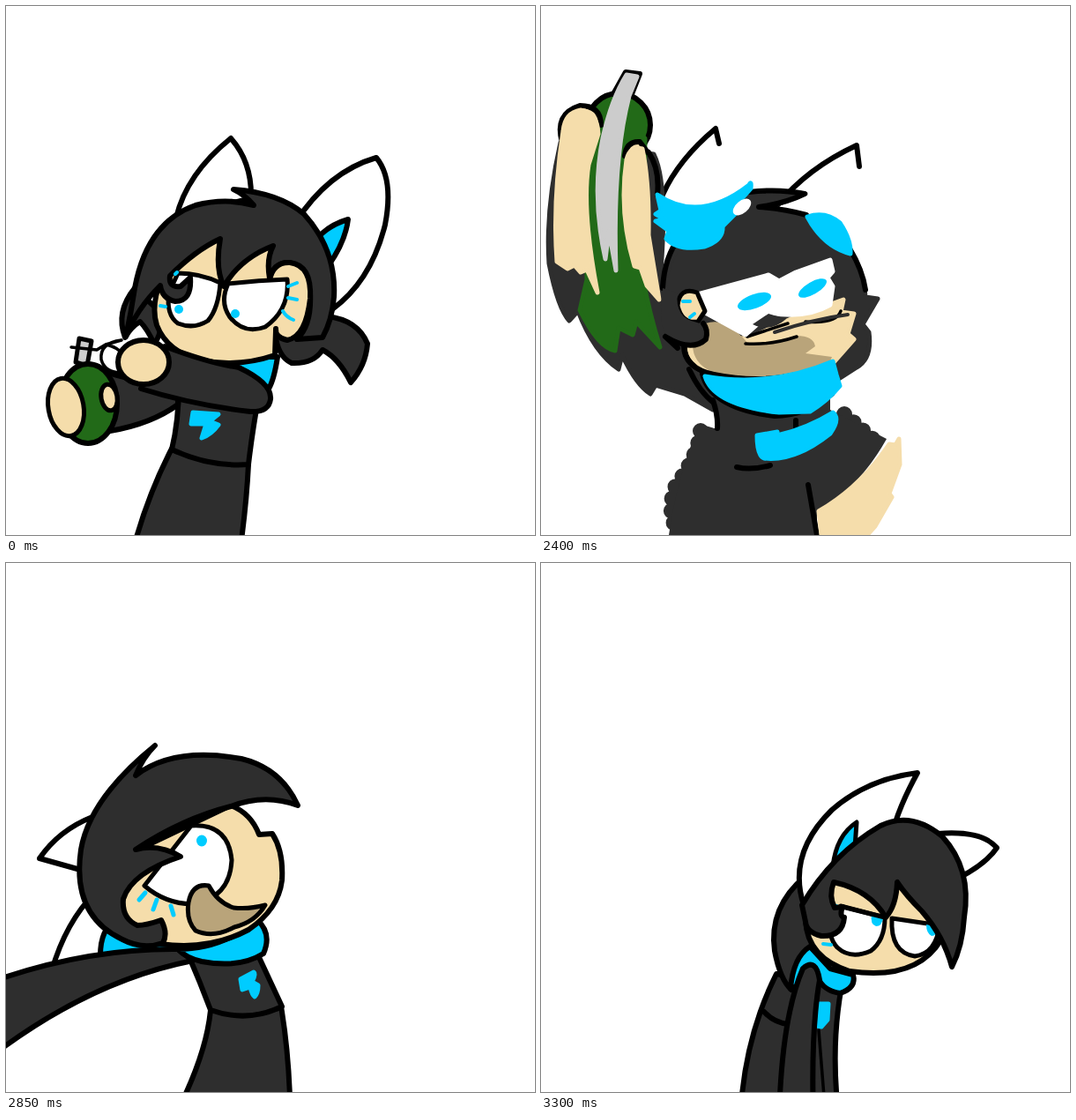
Animation of 600 by 600 pixels, one loop 5300 ms. Source, as an HTML page:

```html
<!DOCTYPE html>
<html lang="en">
<head>
<meta charset="utf-8">
<title>Throw</title>
<style>
html, body { margin: 0; height: 100%; overflow: hidden; background: #fff; }
svg { display: block; width: 100vw; height: 100vh; }
path, ellipse { stroke: #000; stroke-width: 6; stroke-linejoin: round; stroke-linecap: round; fill: none; }
.k { fill: #2e2e2e; } .s { fill: #f5ddab; } .b { fill: #0cf; } .w { fill: #fff; }
.g { fill: #226a18; } .t { fill: #b9a47a; } .a { fill: #ccc; }
.n { stroke: none; }
.e { stroke-width: 5; }
.thin { stroke-width: 3.5; }
.lash { stroke: #0cf; stroke-width: 4; }
.bump { stroke: #2e2e2e; stroke-width: 18; stroke-dasharray: 0 14; }
.hair { stroke: #2e2e2e; stroke-width: 8; }
/* brushed shapes: edge in the fill colour, so that tips are round */
.o { stroke-width: 5; }
.k.o { stroke: #2e2e2e; } .s.o { stroke: #f5ddab; } .b.o { stroke: #0cf; } .w.o { stroke: #fff; }
.g.o { stroke: #226a18; } .a.o { stroke: #ccc; }
</style>
</head>
<body>
<svg viewBox="0 0 600 600">

<!-- pulling the pin -->
<g data-t="0 2400">
  <path class="k" d="M104 411Q125 422 195 432L195 452Q165 474 118 482Z"/>
  <path class="k" d="M188 502Q163 550 147 606H267Q273 560 275 520Z"/>
  <path class="k" d="M196 430Q196 470 188 503Q230 523 275 520Q279 485 287 440Z"/>
  <path class="b o" d="M212 461L210 474 227 474 222 490Q233 486 241 475L231 471 241 463Z"/>
  <path class="b" d="M207 398L308 398Q304 424 298 434Q250 428 202 418Z"/>
  <path class="w" d="M193 240Q205 190 255 150Q279 177 278 218Z"/>
  <path class="w" d="M328 246Q365 188 420 172Q440 196 430 248Q414 312 370 344Z"/>
  <path class="b" d="M350 267Q364 249 388 242Q385 267 366 294Z"/>
  <path class="k" d="M146 320Q124 347 135 376Q142 364 152 358Q160 366 168 383Q176 374 178 350Z"/>
  <path class="k" d="M364 352Q399 356 410 383Q408 408 391 427Q378 400 359 390Q349 406 324 405Q308 398 305 370Z"/>
  <path class="s" d="M176 310Q164 340 171 362Q183 393 222 402Q264 410 305 396L306 368 350 320 300 255 220 250Z"/>
  <path class="w e" d="M195 303Q220 303 243 314Q241 343 229 357Q213 367 195 360Q181 350 185 325Z"/>
  <path class="k" d="M136 375Q142 347 146 320Q160 245 215 226Q249 217 281 226Q271 214 258 208Q310 212 338 236Q375 277 372 330Q370 356 359 376L330 378Q347 362 345 325Q340 291 318 291Q303 293 299 309Q295 287 303 272Q266 286 247 318Q237 298 243 264Q215 277 186 306Q184 320 198 318L209 308Q211 335 192 335Q177 332 175 317Q148 344 136 375Z"/>
  <path class="s" d="M299 311Q303 290 322 291Q347 294 345 332Q340 375 319 379Q305 376 306 366"/>
  <path class="w e" d="M252 315Q286 311 319 310Q322 344 294 364Q270 373 254 353Q242 336 252 315Z"/>
  <path class="lash" d="M320 318L330 314M320 331L330 333M314 346Q318 353 326 356M175 340L181 341M192 304L194 302"/>
  <path class="a e" d="M83 377L97 380 92 408 79 404Z"/>
  <ellipse class="g" cx="93" cy="451" rx="33" ry="45"/>
  <ellipse class="s e" cx="68" cy="455" rx="20" ry="33" transform="rotate(-10 68 455)"/>
  <ellipse class="s e" cx="117" cy="444" rx="9" ry="15" transform="rotate(-10 117 444)"/>
</g>
<g data-t="0 1500">
  <path class="thin" d="M74 387L103 390 113 384 131 379Q106 382 108 401Q112 416 131 416M114 384Q128 388 131 394"/>
  <path class="k" d="M180 386Q230 405 264 410Q302 428 300 446Q298 461 277 460Q210 452 153 434Z"/>
  <ellipse class="s" cx="156" cy="404" rx="29" ry="25"/>
</g>
<g data-t="0 1500,1600 2400">
  <ellipse class="b n" cx="196" cy="344" rx="5" ry="5"/>
  <ellipse class="b n" cx="260" cy="349" rx="5" ry="5"/>
</g>
<g data-t="1500 1600">
  <path class="lash" d="M199 344Q210 342 220 344M262 350Q275 350 286 348"/>
  <path class="k n" d="M99 392Q110 385 205 407Q230 425 300 427L270 460 200 457 110 418Z"/>
  <path class="k" d="M265 427Q320 424 370 427Q400 430 405 441L403 480Q395 509 379 513Q355 508 330 487"/>
  <path class="k n" d="M230 420L290 426 300 465 210 460Z"/>
  <path class="s n" d="M270 440Q290 432 372 438L340 470 334 487Q290 464 234 459Q233 446 255 445Q285 453 320 458L275 446Z"/>
  <path class="s n" d="M138 433Q148 426 199 439Q165 444 138 433Z"/>
  <path class="w n" d="M99 398L190 424 130 418 102 410Z"/>
  <path class="s n" d="M116 406Q122 401 140 405L224 427Q200 436 116 406Z"/>
</g>
<g data-t="1600 2400">
  <path class="k" d="M246 416Q320 424 370 427Q400 430 405 441L403 480Q395 509 379 513Q350 506 328 486Q290 468 240 458"/>
</g>
<g data-t="1500 2400">
  <ellipse class="thin" cx="337" cy="493" rx="14" ry="12"/>
  <path class="thin" d="M325 486L347 494 332 506V524"/>
  <ellipse class="s" cx="361" cy="469" rx="27" ry="27"/>
</g>

<!-- arm swings up -->
<g data-t="2400 2550">
  <path d="M138 214Q156 174 198 139L202 156M268 226Q302 184 358 158L361 182"/>
  <path class="k o" d="M22 155Q5 230 9 292Q19 343 32 357L42 346Q60 393 88 412L92 396Q108 430 124 440L130 430 163 440 195 458 205 400 136 300Q144 200 128 168Z"/>
  <path d="M122 166Q135 185 132 214M168 412Q180 438 196 450"/>
  <ellipse class="g" cx="88" cy="135" rx="36" ry="36"/>
  <path class="g o" d="M57 150Q50 240 52 310L44 345Q65 388 84 391L88 365 104 373 108 358 135 387Q122 345 116 310L118 150 90 125Z"/>
  <path d="M82 100L96 75 112 77 103 100"/>
  <path class="a o" d="M97 78L109 80 100 102Q81 175 85 300L77 255 73 287Q57 215 70 150Q80 105 97 78Z"/>
  <path class="s" d="M24 155Q15 122 44 113Q68 113 68 135"/>
  <path class="s o" d="M25 142Q13 220 18 290L30 298 38 294 45 302 52 299 64 325Q46 230 54 180L65 145Q64 120 45 118Q27 121 25 142Z"/>
  <path class="s" d="M95 170Q97 153 112 154L121 166"/>
  <path class="s o" d="M97 174Q101 158 115 162Q123 200 122 260L134 333 120 317 113 297 106 295Q88 235 97 174Z"/>
  <path class="k o" d="M140 320Q147 250 235 214Q270 207 300 213L258 229Q320 235 350 275Q366 300 368 330L382 332 365 361 372 370Q376 400 358 410L330 428 180 420 150 375Z"/>
  <path d="M138 320Q140 284 157 263M236 211Q270 207 299 213Q277 224 247 228Q275 230 301 237M350 275Q365 300 368 322"/>
  <path class="s" d="M163 378Q157 407 192 417Q250 429 300 416L330 385 230 375Z"/>
  <path class="s o" d="M170 386L240 375 290 352 343 333 340 347 355 349 348 372 355 378 325 412 240 417 180 410Z"/>
  <path class="t n" d="M172 384Q177 354 204 359Q222 366 235 383Q268 382 290 374Q309 374 311 386L300 394 330 398 324 412Q250 428 194 415Q172 405 172 384Z"/>
  <path d="M163 380Q159 410 196 418Q250 429 300 416"/>
  <path class="thin" d="M186 343L234 375 280 360M300 358Q335 361 340 346M232 383Q260 385 290 375"/>
  <path class="w o" d="M174 328L258 305 270 312 289 302 328 288 331 301 325 308 331 318 328 339Q300 355 260 348L232 373 183 346Z"/>
  <path class="k n" d="M240 361L258 349 278 355Q260 371 240 361Z"/>
  <path class="hair" style="stroke-width:4" d="M265 370Q310 355 348 350"/>
  <ellipse class="b n" cx="242" cy="335" rx="20" ry="8" transform="rotate(-20 242 335)"/>
  <ellipse class="b n" cx="308" cy="320" rx="18" ry="7" transform="rotate(-30 308 320)"/>
  <path class="s e" d="M177 325Q157 318 155 340Q160 361 178 358L186 346Z"/>
  <path class="lash" d="M161 335H169M169 353L174 349"/>
  <path class="k n" d="M138 320Q132 365 145 377Q168 391 188 380Q192 362 177 359Q151 354 155 325Z"/>
  <path d="M141 375Q171 393 187 378Q190 367 184 360M141 375L155 388"/>
  <path class="bump" d="M181 482Q178 510 153 544Q143 568 152 590M344 463L376 491"/>
  <path class="k n" d="M180 474L200 480 196 442H328L328 458 392 491Q360 548 313 573V600H145Q155 530 180 474Z"/>
  <path d="M195 447Q201 465 200 479M222 523Q238 527 260 521M303 543L313 600M289 470V480"/>
  <path class="b" d="M183 417Q230 432 290 418L330 440Q300 465 265 465Q192 456 183 417Z"/>
  <path class="b o" d="M186 420Q260 433 331 403L335 418 339 431Q325 448 305 460L270 461Q196 453 186 420Z"/>
  <path class="b o" d="M245 487L268 483 268 487Q302 479 331 461Q340 468 328 485Q288 517 253 513Q245 510 245 487Z"/>
  <path class="s o" d="M315 573Q362 546 395 497L402 498 406 491 407 520 395 553 398 557 379 590 370 600H318Z"/>
  <path class="b o" d="M132 214Q180 247 236 203Q239 197 238 207L218 229 220 236 206 250Q207 266 185 273Q155 278 142 264L145 255 130 244 140 242 130 236 136 232Z"/>
  <ellipse class="w n" cx="228" cy="228" rx="12" ry="7" transform="rotate(-40 228 228)"/>
  <path class="b o" d="M302 239Q323 232 339 246Q352 265 351 281Q320 273 302 239Z"/>
</g>

<!-- held high -->
<g data-t="2550 2700">
  <path class="k" d="M29 155Q28 210 62 278Q98 345 150 402Q175 437 205 458L215 400 150 340 146 205Q144 175 128 157Z"/>
  <path class="a e" d="M101 64L121 67 110 95 93 91Z"/>
  <ellipse class="g" cx="90" cy="136" rx="40" ry="46"/>
  <ellipse class="s" cx="53" cy="131" rx="24" ry="27" transform="rotate(15 53 131)"/>
  <ellipse class="s e" cx="111" cy="162" rx="12" ry="19" transform="rotate(10 111 162)"/>
  <path class="w" d="M146 207Q164 164 205 131Q218 180 220 235L157 282Q150 240 146 207Z"/>
  <path class="b" d="M163 268Q164 232 182 207Q190 225 190 250Z"/>
  <path class="w" d="M276 206Q308 164 366 150Q375 204 354 258Z"/>
  <path class="k" d="M175 398L170 430 205 455 205 420Z"/>
  <path class="k" d="M310 477Q345 508 362 545Q360 572 332 566L318 562Z"/>
  <path class="s e" d="M320 562Q335 569 349 567Q355 590 334 588Q322 584 320 562Z"/>
  <path class="k" d="M208 505Q190 550 176 606H326Q318 550 303 507Z"/>
  <path class="k" d="M203 430L208 505Q254 527 303 507L300 440 311 455 309 484"/>
  <path d="M296 458L303 506"/>
  <path class="b o" d="M252 478L274 473 265 484 278 487Q274 498 263 504L265 494 254 496Z"/>
  <path class="b" d="M190 403Q240 414 312 400Q323 433 305 455Q270 463 233 452Q198 437 190 403Z"/>
  <path class="k" d="M340 300Q378 380 348 417Q342 402 331 389L335 403Q322 402 316 388Z"/>
  <path class="s" d="M160 325Q154 380 185 399Q220 417 273 411Q325 402 340 363Q345 320 330 290L260 260 185 275Z"/>
  <path class="w e" d="M184 317Q199 303 257 307Q262 350 238 369Q206 369 183 340Z"/>
  <path class="w e" d="M265 298Q304 286 328 307Q335 339 315 350L290 350Q294 336 282 336Q263 325 265 298Z"/>
  <ellipse class="b n" cx="247" cy="330" rx="5" ry="6" transform="rotate(-20 247 330)"/>
  <ellipse class="b n" cx="310" cy="311" rx="4.5" ry="5"/>
  <path class="t e" d="M177 377Q191 349 223 357Q242 373 263 372Q277 361 291 363Q303 371 297 395Q285 410 255 411Q202 415 181 397Z"/>
  <ellipse class="s e" cx="179" cy="333" rx="15" ry="18"/>
  <path class="lash" d="M168 326L177 325M176 345L182 342M332 329L334 331"/>
  <path class="k" d="M145 280Q158 250 200 237Q223 206 255 201Q284 199 307 206Q285 218 255 218Q332 229 362 270Q386 315 376 373Q353 355 341 326Q324 294 263 273Q267 305 259 319Q246 300 192 288Q193 306 203 321Q189 320 187 310Q161 314 165 335Q170 352 187 345L194 337Q202 357 187 373L172 370Q178 385 165 393Q136 402 130 437Q105 410 107 373Q113 339 147 343Q140 310 145 280Z"/>
</g>

<!-- wind-up behind -->
<g data-t="2700 2850">
  <path class="k n" d="M205 445Q90 420 118 190L105 210 98 130 80 160Q30 240 -5 330V550Z"/>
  <path class="g n" d="M110 86Q55 105 20 175L-5 235V480Q20 390 35 350L38 370Q60 220 110 86Z"/>
  <path class="s n" d="M68 130Q30 190 -5 300V350L15 310 18 330Q40 220 68 130Z"/>
</g>
<g data-t="2700 3000">
  <path class="w" d="M38 335Q60 303 98 288L88 349Z"/>
  <path class="w" d="M52 462Q68 407 101 374L130 415 108 450Z"/>
  <path class="b" d="M107 445Q107 415 125 405L200 435 190 445Z"/>
  <path class="k" d="M232 507Q228 550 202 606H322Q320 550 312 503Z"/>
  <path class="k" d="M207 445Q220 475 232 507Q274 522 313 503L286 445Z"/>
  <path class="b o" d="M266 472L281 464Q284 466 279 475L286 479Q286 488 282 492Q279 490 277 481L268 484Z"/>
  <path class="k" d="M-8 472Q95 437 195 438L212 451Q100 473-8 553Z"/>
  <path class="b" d="M195 438Q245 438 285 405Q302 420 292 443Q265 460 222 452Q204 448 195 438Z"/>
  <path class="s" d="M130 390Q135 425 175 432Q230 440 275 416Q309 393 313 360Q315 327 302 307L287 308Q278 284 255 275L150 325Z"/>
  <path class="w e" d="M210 298Q252 295 256 337Q254 380 211 387Q180 386 157 366Z"/>
  <ellipse class="b n" cx="222" cy="315" rx="6" ry="6.5"/>
  <path class="lash" style="stroke-width:5" d="M158 374L151 382M171 382L167 393M187 389L190 399"/>
  <path class="t e" d="M207 385Q211 363 230 366Q240 385 258 391Q275 393 294 388Q283 407 259 413Q235 426 215 417Q204 405 207 385Z"/>
  <path class="k" d="M169 207Q95 267 85 325Q74 400 132 427Q155 439 178 431Q184 420 176 405Q159 411 149 411Q131 403 133 381Q143 351 198 333Q173 318 147 325Q200 290 255 276Q294 261 331 275Q312 233 267 222Q190 208 147 241Q155 221 169 207Z"/>
</g>

<!-- throw -->
<g data-t="3000 3150">
  <path class="k n" d="M450 270C540 280 590 315 605 370V515Q470 470 318 475Q285 515 265 605H40Q34 550 52 510L86 455 90 532H182V476Q189 470 190 508H225L250 440 380 420Z"/>
  <path class="bump" style="stroke-width:13" d="M93 526L117 530H180M196 503H228"/>
  <path d="M605 515Q470 467 318 475Q285 515 265 605M70 521Q28 552 42 605"/>
  <path class="w o" style="stroke-width:3" d="M457 284L464 281 473 300ZM478 274L498 277 509 300 502 296ZM488 308L496 353 490 343ZM457 355L463 340 460 375Z"/>
  <path class="g n" d="M-5 358C60 215 190 146 340 146C440 146 540 185 605 235V329C525 275 440 243 350 242C210 240 95 285-5 392Z"/>
  <path d="M11 557Q2 588 38 584"/>
  <path class="b o" d="M15 578Q12 520 36 474L40 474 34 505 56 467 59 470 51 492 59 494Q42 530 36 580Z"/>
  <path class="b o" d="M238 353L244 355 270 387Q295 415 366 444Q330 459 262 445Q227 410 218 388L230 393 220 361Z"/>
  <path class="b o" d="M216 431Q245 462 285 478Q305 474 307 488Q299 512 278 512L236 489 258 491 215 460 252 474Z"/>
  <path d="M253 431Q258 455 312 457Q358 456 372 443"/>
  <path class="thin" d="M234 504Q258 523 288 527"/>
  <path class="hair" d="M208 266L250 280M222 285L260 300M208 302Q225 297 250 310M208 326Q225 320 255 330"/>
  <path class="k n" d="M215 262Q235 258 250 250Q320 238 380 248L438 290 460 300 440 415 275 390 270 365 240 350 235 320 245 290Z"/>
  <path class="w n" d="M336 242H383Q382 261 362 260L356 250ZM383 246Q420 244 463 260L440 295 412 270Z"/>
  <path class="b o" d="M346 244H353L349 246ZM430 255L454 259 444 273 436 272Z"/>
  <path d="M413 163Q402 210 382 248M518 223Q477 267 440 298"/>
  <path class="s" d="M271 382Q280 410 329 429Q377 447 410 425L426 408 421 397 427 391 405 340 375 297 360 340Q330 298 310 293Q278 297 276 331L304 342 305 350 270 367Z"/>
  <path class="w n" d="M281 320Q300 302 330 318L370 332 403 353Q396 408 365 413Q325 412 313 360L304 335 282 345Z"/>
  <path d="M313 360Q322 405 358 412Q390 413 404 354Q385 339 369 331"/>
  <path style="stroke:#0cf;stroke-width:8" d="M288 319Q340 332 385 371"/>
  <path class="k n" d="M272 325L276 346Q292 350 305 336Q309 361 286 370L255 365Z"/>
  <path d="M276 330Q272 347 284 348Q299 346 306 336Q307 361 285 370L270 364M276 330Q279 294 310 293Q338 303 360 341Q374 328 374 297"/>
  <path class="k" d="M375 297Q415 323 425 353Q424 390 441 418Q463 372 461 308Q455 292 437 290"/>
</g>

<!-- aftermath -->
<g data-t="3150 3300"><use href="#rest" transform="translate(-6 24) scale(1.02 .96)"/></g>
<g data-t="3300 5300"><g id="rest">
  <path class="k" d="M267 466Q230 540 226 630H338Q328 550 341 480Z"/>
  <path d="M253 509Q264 521 280 523"/>
  <path class="k" d="M300 355Q258 390 265 440Q271 472 284 484L315 430Z"/>
  <path class="b" d="M283 483Q286 447 305 435L328 460 354 467Q358 482 339 488Q320 485 314 470Z"/>
  <path class="b o" d="M313 500H326L325 518 318 526 308 524Z"/>
  <path class="k" d="M270 630Q273 515 297 460Q312 447 316 473Q306 530 309 630Z"/>
  <path class="thin" d="M315 530L323 630"/>
  <path class="w" d="M298 388Q279 330 330 280Q370 245 427 238Q410 269 402 294Q350 325 298 388Z"/>
  <path class="b e" d="M331 344Q335 309 358 294L356 323Z"/>
  <path class="w" d="M450 307Q500 303 517 323Q505 341 474 357Z"/>
  <path class="s" d="M300 405Q302 448 350 463Q426 474 454 427L450 370 330 350Z"/>
  <path class="w e" d="M340 389L390 402Q390 428 374 440Q351 450 336 436Q325 424 330 408Z"/>
  <path class="w e" d="M398 403L452 411Q448 443 424 446Q396 442 398 403Z"/>
  <path class="b n" d="M375 398L388 402Q387 412 380 412Q373 410 375 398ZM437 410L450 413Q449 423 443 423Q437 420 437 410Z"/>
  <path class="lash" d="M331 388L335 389M320 432L329 433"/>
  <path class="k" d="M296 388Q330 330 385 298Q420 281 455 310Q489 347 480 402Q478 435 466 458Q457 424 432 395Q414 377 404 362Q403 389 391 402Q373 371 332 362Q326 378 333 391L342 390Q338 401 344 402Q342 424 318 423Q301 419 300 407Z"/>
  <path class="e" d="M342 390L390 402"/>
</g></g>
</svg>
<script>
const LOOP = 5300;
const poses = [...document.querySelectorAll('[data-t]')].map(el => ({
  el, spans: el.dataset.t.split(',').map(s => s.split(' ').map(Number))
}));
const start = performance.now();

function draw(now) {
  const t = Math.max(0, now - start) % LOOP;
  for (const { el, spans } of poses)
    el.style.display = spans.some(([a, b]) => t >= a && t < b) ? '' : 'none';
  requestAnimationFrame(draw);
}
draw(start);
</script>
</body>
</html>
```
